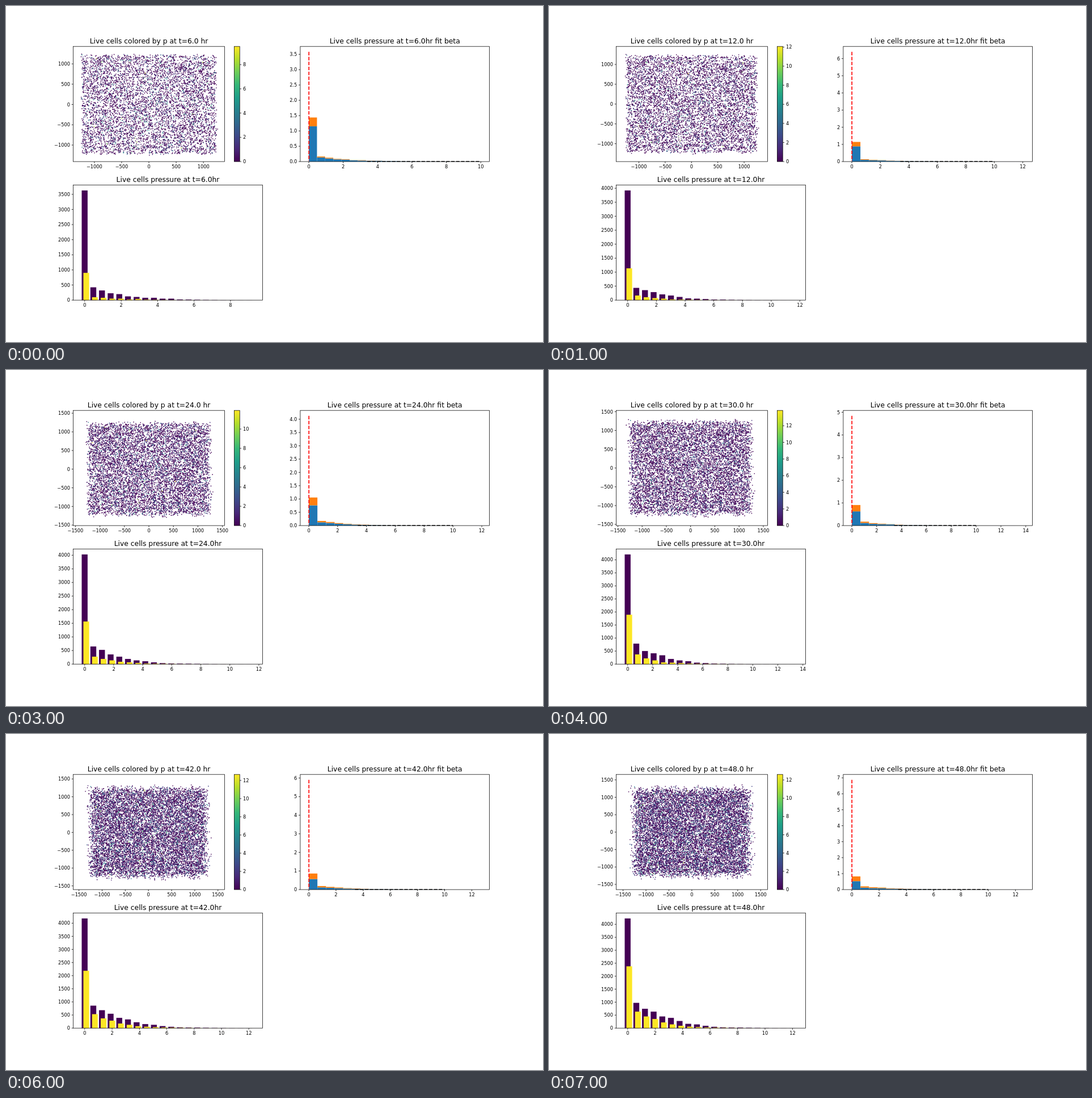
These frames come from a looping animation (947 px wide and 592 px high, 8000 ms). An HTML page with a canvas:

```html
<!DOCTYPE html>
<html lang="en">
<head>
<meta charset="utf-8">
<title>Cell pressure</title>
<style>
  html, body { margin: 0; width: 947px; height: 592px; overflow: hidden; background: #fff; }
  canvas { display: block; }
</style>
</head>
<body>
<canvas id="stage" width="947" height="592"></canvas>
<script>
const ctx = document.getElementById('stage').getContext('2d');
const BINS = 20, STEP_MS = 1000;
const FONT = '"DejaVu Sans", sans-serif';
const VIRIDIS = ['440154', '482878', '3e4989', '31688e', '26828e', '1f9e89', '35b779', '6ece58', 'b5de2b', 'fde725']
  .map(h => [0, 2, 4].map(i => parseInt(h.slice(i, i + 2), 16)));

// Axes boxes: left, top, right, bottom
const SCATTER = { l: 118.6, t: 71.2, r: 385.5, b: 274.1 };
const BAR = { l: 402.4, t: 71.2, r: 412.2, b: 274.1 };
const FIT = { l: 518.9, t: 71.2, r: 852.6, b: 274.1 };
const HIST = { l: 118.6, t: 315.3, r: 452.4, b: 518.2 };

// max: highest pressure; top: peak of the fit; x, y: [pixel of 0, pixels per unit]
// a, b: counts per bin for the two cell types
const states = [
  { max: 9.5, top: 3.58, x: [252, .09615], y: [173.5, .0715],
    a: [3630, 424, 320, 227, 199, 124, 105, 77, 77, 49, 49, 20, 17],
    b: [902, 96, 77, 49, 49, 21, 39, 15] },
  { max: 12.07, top: 6.39, x: [251.3, .0928], y: [172.8, .0698],
    a: [3923, 438, 357, 286, 205, 164, 114, 63, 53, 38, 18, 17],
    b: [1137, 164, 103, 73, 53, 25, 20] },
  { max: 12.13, top: 5.1, x: [251.6, .0905], y: [173, .0695] },
  { max: 11.93, top: 4.126, x: [252, .0864], y: [174.7, .0657],
    a: [4029, 648, 523, 356, 273, 190, 138, 106, 65, 37, 22, 18, 15],
    b: [1565, 273, 190, 138, 85, 65, 44, 23] },
  { max: 13.84, top: 4.84, x: [249.7, .0855], y: [172.7, .0662],
    a: [4205, 785, 502, 415, 339, 198, 143, 111, 57, 40, 20],
    b: [1893, 372, 220, 143, 67, 57, 40, 22] },
  { max: 11.28, top: 4.945, x: [250.5, .0826], y: [173.9, .0644],
    a: [4137, 740, 622, 462, 333, 269, 173, 141, 109, 66, 51, 30, 20, 18],
    b: [1990, 430, 291, 216, 130, 109, 55, 51, 34, 25] },
  { max: 12.66, top: 5.9, x: [251.2, .0817], y: [173.4, .0628] },
  { max: 12.61, top: 6.87, x: [251.9, .0809], y: [172.9, .0614],
    a: [4227, 974, 745, 635, 450, 395, 275, 166, 144, 90, 52, 30, 22, 20],
    b: [2382, 635, 450, 352, 220, 144, 90, 57, 40, 25] }
];

function extend(list) {
  const out = list.slice();
  while (out.length < BINS) out.push(out[out.length - 1] * .68);
  return out;
}
for (const s of states) if (s.a) { s.a = extend(s.a); s.b = extend(s.b); }
states.forEach((s, i) => {
  for (const key of ['a', 'b'])
    if (!s[key]) s[key] = states[i - 1][key].map((v, j) => (v + states[i + 1][key][j]) / 2);
});
for (const s of states) {
  s.sums = s.a.map((v, i) => v + s.b[i]);
  s.total = s.sums.reduce((p, q) => p + q);
}

let seed = 90210;
function rand() {
  seed = (seed + 0x6D2B79F5) | 0;
  let n = Math.imul(seed ^ seed >>> 15, 1 | seed);
  n = n + Math.imul(n ^ n >>> 7, 61 | n) ^ n;
  return ((n ^ n >>> 14) >>> 0) / 4294967296;
}
const gauss = () => Math.sqrt(-2 * Math.log(1 - rand())) * Math.cos(2 * Math.PI * rand());
const cells = Array.from({ length: 13000 }, () => ({
  x: (rand() * 2 - 1) * 1225, y: (rand() * 2 - 1) * 1215,
  dx: gauss(), dy: gauss(), u: rand(), v: rand()
}));

function viridis(f) {
  const p = Math.min(Math.max(f, 0), .9999) * (VIRIDIS.length - 1), i = Math.floor(p);
  return `rgb(${VIRIDIS[i].map((c, j) => Math.round(c + (VIRIDIS[i + 1][j] - c) * (p - i)))})`;
}

function text(str, x, y, size, align) {
  ctx.font = `${size}px ${FONT}`;
  ctx.textAlign = align;
  ctx.fillStyle = '#000';
  ctx.fillText(str, x, y);
}

function line(x1, y1, x2, y2) {
  ctx.beginPath();
  ctx.moveTo(x1, y1);
  ctx.lineTo(x2, y2);
  ctx.stroke();
}

function rect(x1, y1, x2, y2, color) {
  ctx.fillStyle = color;
  ctx.fillRect(x1, y1, x2 - x1, y2 - y1);
}

const label = (v, digits) => v.toFixed(digits).replace('-', '\u2212');
const title = (box, str) => text(str, (box.l + box.r) / 2, box.t - 5.1, 12.33, 'center');

function ticks(axis, box, [zero, scale], step, digits = 0) {
  const vertical = axis !== 'x';
  const lo = vertical ? box.t : box.l, hi = vertical ? box.b : box.r;
  for (let n = -20; n <= 20; n++) {
    const v = n * step, p = zero + (vertical ? -v : v) * scale;
    if (p < lo - .4 || p > hi + .4) continue;
    if (axis === 'x') {
      line(p, box.b, p, box.b + 2.9);
      text(label(v, digits), p, box.b + 11.9, 8.22, 'center');
    } else if (axis === 'y') {
      line(box.l - 2.9, p, box.l, p);
      text(label(v, digits), box.l - 5.7, p + 3.1, 8.22, 'right');
    } else {
      line(box.r, p, box.r + 2.9, p);
      text(label(v, digits), box.r + 5.7, p + 3.1, 8.22, 'left');
    }
  }
}

function frame(box) {
  ctx.setLineDash([]);
  ctx.strokeStyle = '#000';
  ctx.lineWidth = .75;
  ctx.strokeRect(box.l, box.t, box.r - box.l, box.b - box.t);
}

function pressureOf(cell, s) {
  let left = cell.u * s.total, i = 0;
  while (i < BINS - 1 && left > s.sums[i]) left -= s.sums[i++];
  return i ? (i + cell.v) / BINS : cell.v ** 6 / BINS;
}

function drawScatter(s, index, hours) {
  const spread = 18 + index * 7;
  ctx.save();
  ctx.beginPath();
  ctx.rect(SCATTER.l, SCATTER.t, SCATTER.r - SCATTER.l, SCATTER.b - SCATTER.t);
  ctx.clip();
  const count = Math.min(cells.length, Math.round(s.total));
  for (let i = 0; i < count; i++) {
    const c = cells[i];
    ctx.fillStyle = viridis(pressureOf(c, s));
    ctx.beginPath();
    ctx.arc(s.x[0] + (c.x + c.dx * spread) * s.x[1], s.y[0] - (c.y + c.dy * spread) * s.y[1], .84, 0, 7);
    ctx.fill();
  }
  ctx.restore();
  frame(SCATTER);
  ticks('x', SCATTER, s.x, 500);
  ticks('y', SCATTER, s.y, 500);
  title(SCATTER, `Live cells colored by p at t=${hours} hr`);

  const ramp = ctx.createLinearGradient(0, BAR.b, 0, BAR.t);
  VIRIDIS.forEach((c, i) => ramp.addColorStop(i / (VIRIDIS.length - 1), `rgb(${c})`));
  rect(BAR.l, BAR.t, BAR.r, BAR.b, ramp);
  frame(BAR);
  ticks('right', BAR, [BAR.b, (BAR.b - BAR.t) / s.max], 2);
}

function drawFit(s, hours) {
  const x0 = 534, sx = 303.3 / Math.max(10, s.max), limit = s.top * 1.05;
  const sy = (FIT.b - FIT.t) / limit, width = s.max / BINS;
  const height = n => n / (s.total * width) * sy;
  for (let i = 0; i < BINS; i++) {
    const l = x0 + i * width * sx, r = l + width * sx, mid = FIT.b - height(s.a[i]);
    rect(l, mid, r, FIT.b, '#1f77b4');
    rect(l, FIT.b - height(s.sums[i]), r, mid, '#ff7f0e');
  }
  ctx.setLineDash([6.1, 2.6]);
  ctx.strokeStyle = '#000';
  ctx.lineWidth = 1.3;
  line(x0 + 3.4 * sx, FIT.b - .2, x0 + 10 * sx, FIT.b - .2);
  ctx.strokeStyle = '#f00';
  ctx.lineWidth = 1.64;
  line(x0 + .2, FIT.b - s.top * sy, x0 + .2, FIT.b - 1);
  frame(FIT);
  const step = limit < 4.6 ? .5 : 1;
  ticks('x', FIT, [x0, sx], 2);
  ticks('y', FIT, [FIT.b, sy], step, step < 1 ? 1 : 0);
  title(FIT, `Live cells pressure at t=${hours}hr fit beta`);
}

function drawHist(s, hours) {
  const x0 = 138.8, pitch = 15.27, sy = (HIST.b - HIST.t) / (s.a[0] * 1.05);
  for (let i = 0; i < BINS; i++) {
    const x = x0 + i * pitch;
    rect(x - 5.3, HIST.b - s.a[i] * sy, x + 5.1, HIST.b, '#440154');
    rect(x - 2.3, HIST.b - s.b[i] * sy, x + 7.8, HIST.b, '#fde725');
  }
  frame(HIST);
  ticks('x', HIST, [x0, pitch * BINS / s.max], 2);
  ticks('y', HIST, [HIST.b, sy], 500);
  title(HIST, `Live cells pressure at t=${hours}hr`);
}

function draw(index) {
  const s = states[index], hours = ((index + 1) * 6).toFixed(1);
  rect(0, 0, 947, 592, '#fff');
  drawScatter(s, index, hours);
  drawFit(s, hours);
  drawHist(s, hours);
}

const start = performance.now();
let shown = -1;
function tick() {
  const index = Math.floor((performance.now() - start) / STEP_MS) % states.length;
  if (index !== shown) draw(shown = index);
  requestAnimationFrame(tick);
}
tick();
</script>
</body>
</html>
```
